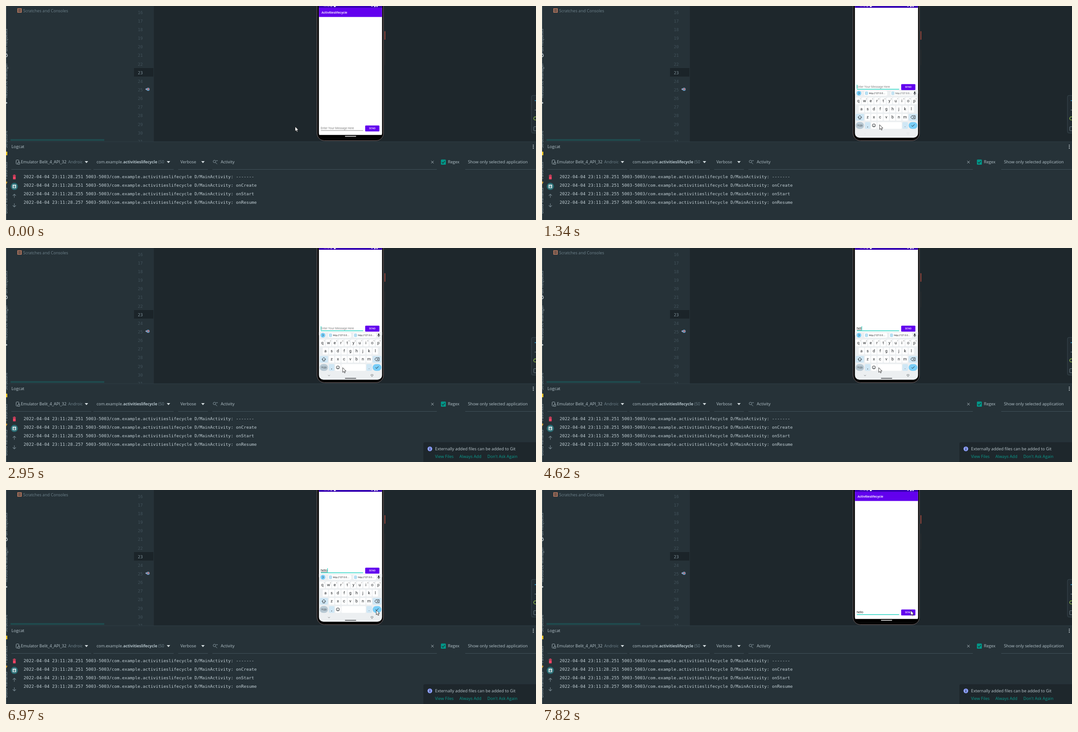
Recreate the animation shown at these times as an HTML page. Size 1176 px wide and 476 px high, loop 8 s.

```html
<!DOCTYPE html>
<html lang="en">
<head>
<meta charset="utf-8">
<title>Lifecycle log</title>
<style>
html, body { margin: 0; width: 100%; height: 100%; overflow: hidden; background: #263238; }
svg { display: block; width: 100%; height: 100%; }
text { font-family: "Open Sans", "Noto Sans", sans-serif; white-space: pre; }
.mono { font-family: "DejaVu Sans Mono", "Noto Sans Mono", monospace; }
.app { font-family: Roboto, sans-serif; }
.mid { text-anchor: middle; }
</style>
</head>
<body>
<svg id="stage" viewBox="0 0 1176 476">
  <defs>
    <clipPath id="screenClip"><path d="M694.3-2H834.4V283a10 10 0 0 1-10 10H704.3a10 10 0 0 1-10-10Z"/></clipPath>
    <clipPath id="editorClip"><path d="M0 0H1176V301.5H0Z"/></clipPath>
    <clipPath id="deviceClip"><path d="M0 335H169.5V360H0Z"/></clipPath>
  </defs>
  <g id="ide"></g>
  <g id="phone"></g>
  <g clip-path="url(#screenClip)">
    <rect x="693" y="-2" width="143" height="297" fill="#000"/>
    <rect id="homePill" x="752" y="289" width="25" height="1.6" rx=".8" fill="#fff"/>
    <g id="content"></g>
    <g id="keyboard"></g>
    <g id="nav"></g>
    <g id="status"></g>
  </g>
  <g id="notice"></g>
  <path id="cursor" d="M0 0V10.6L2.4 8.4 4 12 5.8 11.2 4.2 7.7H7.5Z" fill="#fff" stroke="#111" stroke-width=".8"/>
</svg>
<script>
const LOOP = 8000;
const $ = id => document.getElementById(id);

function add(parent, tag, attrs, label) {
  const node = document.createElementNS("http://www.w3.org/2000/svg", tag);
  for (const key in attrs) node.setAttribute(key, attrs[key]);
  if (label !== undefined) node.textContent = label;
  parent.appendChild(node);
  return node;
}
const box = (p, x, y, width, height, fill, rx = 0, more = {}) =>
  add(p, "rect", { x, y, width, height, fill, rx, ...more });
const dot = (p, cx, cy, r, fill, more = {}) => add(p, "circle", { cx, cy, r, fill, ...more });
const line = (p, d, stroke, width = 1, more = {}) =>
  add(p, "path", { d, stroke, "stroke-width": width, fill: "none", ...more });
const shape = (p, d, fill) => add(p, "path", { d, fill });
const write = (p, x, y, label, size, fill, more = {}) =>
  add(p, "text", { x, y, "font-size": size, fill, ...more }, label);

function drawEditor(ide) {
  const g = add(ide, "g", { "clip-path": "url(#editorClip)" });
  box(g, 0, 0, 1176, 302, "#263238");
  box(g, 328, 0, 848, 302, "#1e272c");
  box(g, 284, 138, 43, 19, "#1b2429");
  for (let n = 16; n <= 31; n++)
    write(g, 292.5, 17.6 + (n - 16) * 19.15, n, 9.2, n === 23 ? "#81939c" : "#42525b", { class: "mono" });

  box(g, 25, 5, 10, 10, "#a8705a", 1);
  line(g, "M27 7.7H33M27 10H33M27 12.3H33", "#263238");
  write(g, 38, 14, "Scratches and Consoles", 9.1, "#6f838d");
  box(g, 10, 296, 208, 4, "#1f4a4d");

  dot(g, 311.2, 185, 1.7, "#a5a9c4");
  dot(g, 315.3, 185.2, 3.5, "#6c9cc4");
  dot(g, 315.8, 184.8, 1.7, "#d0605c");

  // Toolbar cut by the right edge
  box(g, 1166, 199, 20, 83.5, "#222c32", 3, { stroke: "#3a4950" });
  line(g, "M1173 210.5H1176", "#2fa8e0", 1.4);
  line(g, "M1173 231.5H1176", "#75868e", 1.2);
  dot(g, 1174.5, 250, 3.6, "none", { stroke: "#8bb34a", "stroke-width": 1.5 });
  box(g, 1171, 268.5, 9, 9, "none", 1, { stroke: "#71828a" });
}

function drawLeftStrip(ide) {
  line(ide, "M.5 0V476", "#55646b", 1);
  const tabs = [[107, "Pull Requests"], [205, "Resource Manager"], [316, "Structure"], [385, "Favorites"], [462, "Build Variants"]];
  for (const [y, label] of tabs)
    write(ide, 0, 0, label, 9, "#9aa9b0", { transform: `translate(2.5 ${y}) rotate(-90)` });
  dot(ide, 0, 110, 3, "none", { stroke: "#cbd3d7", "stroke-width": 1.3 });
  dot(ide, 1, 215.5, 1.8, "#c2ccd0");
  box(ide, 0, 324, 3, 8, "#f2c425");
  shape(ide, "M0 389L1 391 4 391.5 1.5 393.5 2 396 0 395Z", "#d9a43a");
}

function drawLogcat(ide) {
  const ink = "#b4c3ca", dim = "#70838d", base = 350.3;
  box(ide, 0, 302, 1176, 174, "#263238");
  box(ide, 0, 301.5, 1176, 1, "#2f3d44");
  write(ide, 12, 316.4, "Logcat", 9.4, ink);
  for (const y of [309.5, 313, 316.5]) dot(ide, 1170, y, 1.1, "#d5dde0");

  for (const [a, b] of [[12, 189], [194, 372], [382, 448], [458, 956], [1019, 1176]])
    line(ide, `M${a} 363.5H${b}`, "#42525a");
  for (const x of [178.5, 360.5, 437]) shape(ide, `M${x - 3.8} 345H${x + 3.8}L${x} 349.5Z`, "#d5dde0");

  box(ide, 22.5, 342.5, 6, 9, "none", 1, { stroke: "#a3b2b9" });
  box(ide, 26.5, 347.5, 4, 4.5, "#263238", .5, { stroke: "#a3b2b9" });
  const device = add(ide, "g", { "clip-path": "url(#deviceClip)" });
  write(device, 33, base, "Emulator Belit_4_API_32", 9.05, ink);
  write(device, 138, base, "Android", 9.05, dim);
  write(ide, 201, base, "com.example.", 9, ink);
  write(ide, 260, base, "activitieslifecycle", 8.75, ink, { "font-weight": 700 });
  write(ide, 338, base, "(50", 9, dim);
  write(ide, 387, base, "Verbose", 9.2, ink);
  dot(ide, 462.5, 345.8, 2.8, "none", { stroke: "#8a9ba3" });
  line(ide, "M464.5 348L468.5 351.5M466 344H470", "#8a9ba3");
  write(ide, 476.5, base, "Activity", 9.2, ink);
  line(ide, "M943.5 344.5L949 350M949 344.5L943.5 350", "#a9b7bd");
  box(ide, 965, 341.5, 11, 11.5, "#009688", 1.5);
  line(ide, "M967.3 347.5L969.6 349.8 973.8 344.8", "#20302f", 1.3);
  write(ide, 980.5, base, "Regex", 9.2, ink);
  write(ide, 1025, base, "Show only selected application", 9.3, ink);

  shape(ide, "M15 376.3H17V375.3H20V376.3H22V377.6H15ZM15.6 378.4H21.4V385.5H15.6Z", "#ff4365");
  dot(ide, 18.5, 401.3, 8, "#2a6f76");
  box(ide, 14.5, 397.3, 8, 8, "#d2dde0", 1);
  line(ide, "M18.5 398.8V403.5M16.5 401.5L18.5 403.7 20.5 401.5", "#2a6f76", 1.2);
  line(ide, "M18.5 426.5V418.5M15 422L18.5 418.5 22 422", "#75868e", 1.1);
  line(ide, "M18.5 439V447M15 443.5L18.5 447 22 443.5", "#75868e", 1.1);

  const rows = [["251", "-------"], ["251", "onCreate"], ["255", "onStart"], ["257", "onResume"]];
  rows.forEach(([ms, call], i) => write(ide, 39, 382.6 + i * 19.15,
    `2022-04-04 23:11:28.${ms} 5003-5003/com.example.activitieslifecycle D/MainActivity: ${call}`,
    9.56, "#c2cfd5", { class: "mono" }));
}

function drawPhone(g) {
  box(g, 840, 56, 1.4, 19, "#c9503f", .5);
  box(g, 840, 97, 1.2, 35, "#2a2c2e", .5);
  add(g, "path", { d: "M690.2-4V283a16.5 16.5 0 0 0 16.5 16.5H821a16.5 16.5 0 0 0 16.5-16.5V-4", fill: "#050505", stroke: "#77696a", "stroke-width": 1 });
}

function drawContent(g) {
  box(g, 693, 4, 143, 282.8, "#fff");
  box(g, 693, 0, 143, 24.4, "#6200ee");
  write(g, 700, 17, "Activitieslifecycle", 7.25, "#fff", { class: "app", "font-weight": 500 });
  const hint = write(g, 698.3, 273.8, "Enter Your Message Here", 6.55, "#858585", { class: "app" });
  const typed = write(g, 698.3, 273.8, "", 6.8, "#222", { class: "app" });
  const compose = box(g, 698.5, 275, 0, .6, "#333");
  const under = box(g, 698.5, 276.5, 94, 1, "#858585");
  const caret = box(g, 698.5, 267, 1, 9, "#03cdb9");
  box(g, 797, 265.8, 31.5, 13.2, "#6200ee", 1.5);
  write(g, 812.9, 274.4, "SEND", 5.1, "#fff", { class: "app mid", "font-weight": 500, "letter-spacing": .5 });
  return { hint, typed, compose, under, caret };
}

function drawKeyboard(g) {
  const ink = "#1f2326", blue = "#d0e7f5", sky = "#78cdf7";
  const cap = (x, y, label, size = 9.2) => write(g, x, y, label, size, ink, { class: "app mid" });
  box(g, 693, 187, 143, 120, "#eceff1");
  dot(g, 703.2, 194, 5.2, sky);
  line(g, "M702.3 191.8L704.5 194 702.3 196.2", ink, .9);
  const chips = [715, 770.5].map(x => {
    const chip = add(g, "g", {});
    box(chip, x, 188.8, 51, 10.6, "#fff", 3);
    box(chip, x + 2.5, 191, 5, 6.2, "#d9effb", .8, { stroke: "#5bb4dd", "stroke-width": .7 });
    line(chip, `M${x + 3.8} 193.3H${x + 6.2}M${x + 3.8} 195H${x + 6.2}`, "#5bb4dd", .6);
    write(chip, x + 10.5, 196, "http://127.0.0....", 5.1, ink, { class: "app" });
    return chip;
  });
  box(g, 825.8, 190.2, 2.4, 4.6, ink, 1.2);
  line(g, "M824.5 193.5a2.5 2.5 0 0 0 5 0M827 196V198", ink, .8);

  const rows = [["qwertyuiop", 701.9, 211], ["asdfghjkl", 708.8, 229.2], ["zxcvbnm", 722.6, 247.4]];
  rows.forEach(([keys, x0, y], row) => [...keys].forEach((key, i) => {
    const x = x0 + i * 13.83;
    box(g, x - 6, y - 7.5, 12, 15, "#fff", 2);
    cap(x, y + 3, key);
    if (!row) write(g, x + 4, y - 3.4, (i + 1) % 10, 3.6, "#555", { class: "app mid" });
  }));
  box(g, 696, 240, 18.5, 15, blue, 2);
  line(g, "M705.2 243.3L709.5 247.8H707.2V251.3H703.2V247.8H700.9Z", ink, .9);
  box(g, 813.5, 240, 19.5, 15, blue, 2);
  line(g, "M818.2 247.4L821 244H828V250.8H821ZM822.8 245.7L826.2 249.1M826.2 245.7L822.8 249.1", ink, .9);

  box(g, 696, 258.3, 18.5, 15, "#b7c8d3", 7.5);
  cap(705.2, 267.8, "?123", 5.2);
  box(g, 716.6, 258.3, 12, 15, blue, 2);
  cap(722.6, 268.5, ",");
  box(g, 730.4, 258.3, 12, 15, "#fff", 2);
  dot(g, 736.4, 265.6, 3.5, "none", { stroke: ink, "stroke-width": .9 });
  dot(g, 735.1, 264.6, .5, ink);
  dot(g, 737.7, 264.6, .5, ink);
  line(g, "M734.5 266.4a2 2 0 0 0 3.8 0", ink, .8);
  box(g, 744.2, 258.3, 54, 15, "#fff", 2);
  box(g, 799.8, 258.3, 12, 15, blue, 2);
  cap(805.8, 268.5, ".");
  const enter = box(g, 813.5, 258.3, 19.5, 15, sky, 7.5);
  line(g, "M820 265.8L822.2 268 826.6 263.4", ink, 1);
  return { chips, enter };
}

function drawNav(g) {
  const grey = "#6a7074";
  const icons = add(g, "g", {});
  line(icons, "M714.7 282.5L716.7 284.5 718.7 282.5", grey, .9);
  box(icons, 809.8, 281.3, 4.6, 3, "none", .4, { stroke: grey, "stroke-width": .8 });
  line(icons, "M811.2 286H813", grey, .8);
  const pill = box(g, 752, 289, 25, 1.6, "#3a3d40", .8);
  return { icons, pill };
}

function drawStatus(g) {
  box(g, 693, -2, 143, 6, "#3700b3");
  const clock = write(g, 704.5, 2, "", 5.2, "#fff", { class: "app" });
  dot(g, 721.7, 0, 1.7, "none", { stroke: "#fff", "stroke-width": .9 });
  box(g, 727.5, -2, 4, 4.3, "#fff", .7);
  shape(g, "M809.5-1H814.5L812 2Z", "#fff");
  shape(g, "M816 2.2L820-2V2.2Z", "#fff");
  box(g, 822, -2, 2.4, 4.3, "#fff", .4);
  return { clock };
}

function drawNotice(g) {
  const teal = "#0a9a8c";
  box(g, 926, 432, 256, 50, "#1e272c", 4);
  dot(g, 940.5, 446.8, 5.2, "#8c9eff");
  write(g, 940.5, 450, "i", 8.6, "#1e272c", { class: "mid", "font-weight": 700 });
  write(g, 952, 450.3, "Externally added files can be added to Git", 9.25, "#bdcad0");
  write(g, 952, 466.8, "View Files", 9.2, teal);
  write(g, 1006, 466.8, "Always Add", 9.2, teal);
  write(g, 1068, 466.8, "Don't Ask Again", 9.2, teal);
}

drawEditor($("ide"));
drawLogcat($("ide"));
drawLeftStrip($("ide"));
drawPhone($("phone"));
const field = drawContent($("content"));
const keys = drawKeyboard($("keyboard"));
const nav = drawNav($("nav"));
const bar = drawStatus($("status"));
drawNotice($("notice"));

// Each track lists [start ms, values...]; a value holds until the next entry.
const pointer = [
  [0, 641.6, 268.2], [120, 650, 262], [270, 678, 246], [400, 712, 238], [530, 735, 246],
  [680, 746, 259], [820, 749, 264], [2950, 747, 266], [5890, 747, 262], [6170, 766, 224],
  [6300, 778, 229], [6430, 796, 243], [6560, 812, 258], [6700, 823, 270], [6820, 823, 268],
  [6960, 821.5, 267], [7400, 819, 268], [7550, 818, 268]
];
const pan = [[0, 0], [1190, 52], [1340, 92], [1470, 93], [7250, 32.8], [7400, 6], [7550, 0]];
const sheet = [[0, 0, 0], [1190, 30, .5], [1340, 0, 1], [7250, 45, .22], [7400, 90, 0]];
const caretOn = [
  [0, 0], [1190, 1], [1790, 0], [2290, 1], [2660, 0], [2950, 1], [5280, 0],
  [5740, 1], [6170, 0], [6700, 1], [7120, 0], [7250, 1], [7700, 0]
];
const typing = [[0, ""], [3510, "h"], [4080, "he"], [4320, "hel"], [4500, "hell"], [4870, "hello"]];
const noticeFade = [[0, 0], [2290, .35], [2410, .75], [2660, 1]];
const iconFade = [[0, 0], [1340, .08], [1600, .5], [1790, 1], [7250, 0]];

function at(track, t) {
  let now = track[0];
  for (const step of track) if (step[0] <= t) now = step;
  return now.slice(1);
}
const set = (node, name, value) => node.setAttribute(name, value);
const fade = (node, value) => set(node, "opacity", value);
const move = (node, x, y) => set(node, "transform", `translate(${x} ${y})`);

function render(t) {
  move($("cursor"), ...at(pointer, t));
  move($("content"), 0, -at(pan, t)[0]);

  const [drop, alpha] = at(sheet, t);
  move($("keyboard"), 0, drop);
  fade($("keyboard"), alpha);
  fade($("homePill"), alpha ? 0 : 1);
  const settling = t >= 1190 && t < 1470;
  move(keys.chips[1], settling ? 3 : 0, 0);
  fade(keys.chips[0], alpha * alpha);
  fade(keys.chips[1], alpha * alpha * (settling ? .75 : 1));
  set(keys.enter, "fill", t >= 7120 ? "#5fb8e4" : "#78cdf7");
  fade(nav.icons, at(iconFade, t)[0]);
  fade(nav.pill, t >= 2950 && alpha ? 1 : 0);

  const [word] = at(typing, t);
  const focused = t >= 1070;
  field.typed.textContent = word;
  const width = word ? field.typed.getComputedTextLength() : 0;
  fade(field.hint, word ? 0 : 1);
  set(field.compose, "width", t < 7250 ? width : 0);
  set(field.caret, "x", 698.5 + width);
  fade(field.caret, at(caretOn, t)[0]);
  set(field.under, "fill", focused ? "#03cdb9" : "#858585");
  set(field.under, "height", focused ? 1.3 : 1);

  bar.clock.textContent = t < 4400 ? "11:13" : "11:14";
  fade($("notice"), at(noticeFade, t)[0]);
}

const start = performance.now();
function tick() {
  render((performance.now() - start) % LOOP);
  requestAnimationFrame(tick);
}
tick();
</script>
</body>
</html>
```
